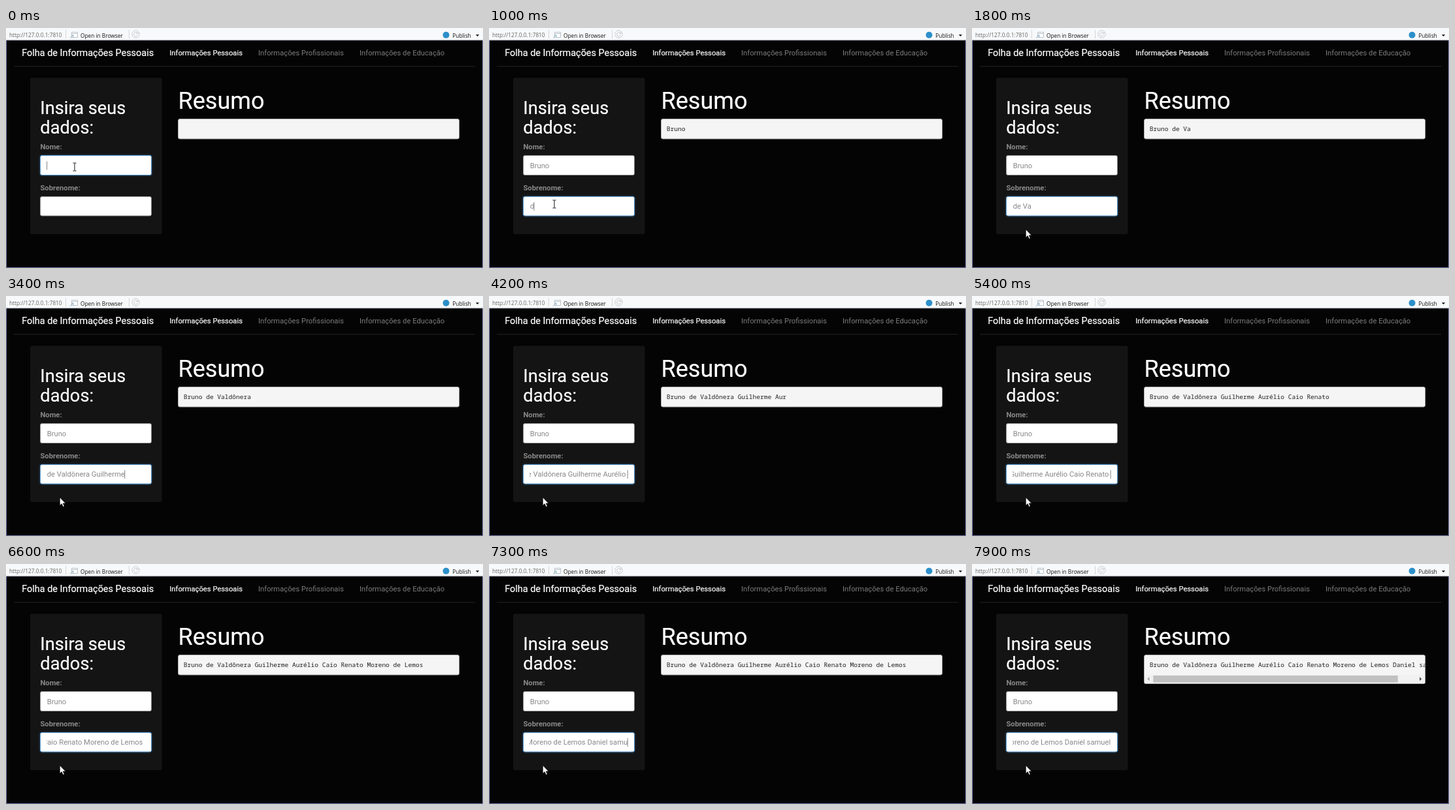
Write an HTML page that moves like this. It is 730 px wide and 368 px high and loops after 8000 ms.

```html
<!DOCTYPE html>
<html lang="pt">
<head>
<meta charset="utf-8">
<style>
html, body { margin: 0; width: 100%; height: 100%; overflow: hidden; background: #040404; }
svg { display: block; width: 730px; height: 368px; }
text { font: 11.22px Roboto, sans-serif; fill: #888; white-space: pre; }
.ui text { font: 8.3px "Open Sans", sans-serif; fill: #111; }
.ui .url { fill: #666; }
.brand { font-size: 14.43px; }
.h3 { font-size: 27.25px; }
.h2 { font-size: 36.1px; }
.brand, .on, .h2, .h3 { fill: #fff; stroke: #fff; stroke-width: .22; }
.link { fill: #7c7c7c; }
.label { font-weight: bold; }
.mono { font: 9.55px "Noto Sans Mono", monospace; fill: #222; }
.box { fill: #fff; stroke: #8c8c8c; }
.focus { stroke: #5b9bd0; filter: drop-shadow(0 0 1.5px rgba(70, 130, 190, .55)); }
</style>
</head>
<body>
<svg viewBox="0 0 730 368">
  <defs>
    <clipPath id="fieldClip"><rect x="62" y="190" width="151.5" height="105"/></clipPath>
    <clipPath id="preClip"><rect x="264" y="140" width="429.5" height="30"/></clipPath>
  </defs>
  <rect width="730" height="368" fill="#040404"/>
  <path d="M.5 18V367.5H729.5V18" fill="none" stroke="#7a80ae"/>

  <g class="ui">
    <rect width="730" height="18.5" fill="#f8f9fa"/>
    <path d="M0 18.7H730" stroke="#aeb5c2"/>
    <path d="M91.5 3V16M188.5 3V16" stroke="#d3d6d9"/>
    <text class="url" x="5" y="14">http://127.0.0.1:7810</text>
    <g fill="#fff" stroke="#b9c3cb">
      <path d="M100.5 6.5H109.5V14.5H100.5ZM100.5 8.5H109.5"/>
      <path d="M98 15.5L103 11M100 11H103V14" fill="none" stroke="#8eb0c4"/>
    </g>
    <text x="114" y="14.5">Open in Browser</text>
    <g fill="none" stroke="#c6cacd">
      <circle cx="198.5" cy="9.5" r="5.7"/>
      <path d="M201 8A3 3 0 1 0 201.4 10.5M202 6V8.5H199.5"/>
    </g>
    <circle cx="673.5" cy="10.8" r="5" fill="#2c8fc9"/>
    <text x="683.3" y="14.5">Publish</text>
    <path d="M718.8 10H724.2L721.5 13Z" fill="#222"/>
  </g>

  <text class="brand" x="24.3" y="43">Folha de Informações Pessoais</text>
  <text class="on" x="250.3" y="41.7">Informações Pessoais</text>
  <text class="link" x="386" y="41.7">Informações Profissionais</text>
  <text class="link" x="541" y="41.7">Informações de Educação</text>
  <path d="M12 58.8H718" stroke="#242424"/>

  <rect x="37" y="76.5" width="201.5" height="239.5" rx="3" fill="#141414"/>
  <text class="h3" x="52.3" y="132">Insira seus</text>
  <text class="h3" x="52.3" y="161.7">dados:</text>
  <text class="label" x="52.4" y="186.3">Nome:</text>
  <text class="label" x="52.4" y="248.8">Sobrenome:</text>
  <rect id="box0" x="52.5" y="195.5" width="170" height="30" rx="2.5"/>
  <rect id="box1" x="52.5" y="258.5" width="170" height="29.5" rx="2.5"/>
  <g clip-path="url(#fieldClip)">
    <text id="first" x="62.7" y="214.5"></text>
    <text id="last" y="277.2"></text>
    <rect id="caret" width=".9" height="13" fill="#777"/>
  </g>

  <text class="h2" x="263.5" y="123.8">Resumo</text>
  <rect id="pre" x="263.5" y="139.5" width="430" rx="2.5" fill="#f5f5f5" stroke="#a8a8a8"/>
  <g clip-path="url(#preClip)"><text class="mono" id="out" x="271.8" y="158.3"></text></g>
  <g id="bar">
    <rect x="264" y="170" width="429" height="13" fill="#f1f1f1"/>
    <rect id="thumb" x="277.3" y="171" height="10.5" fill="#c1c1c1"/>
    <path d="M271.5 173.2V179.2L268.3 176.2Z" fill="#a3a3a3"/>
    <path d="M685 173.2V179.2L688.2 176.2Z" fill="#505050"/>
  </g>

  <g id="mouse">
    <path id="beam" d="M-2.5 -6H-.7L0 -5.4L.7 -6H2.5M-2.5 6H-.7L0 5.4L.7 6H2.5M0 -5.4V5.4" fill="none" stroke="#111"/>
    <path id="arrow" d="M0 0V12.6L2.9 9.9L5 14.6L7 13.7L5 9.2H8.9Z" fill="#fff" stroke="#000" stroke-width=".7"/>
  </g>
</svg>
<script>
const $ = id => document.getElementById(id);
const set = (id, attrs) => { for (const k in attrs) $(id).setAttribute(k, attrs[k]); };
const show = (id, on) => set(id, { visibility: on ? 'visible' : 'hidden' });

const FIRST = 'Bruno';
const LAST = 'de Valdônera Guilherme Aurélio Caio Renato Moreno de Lemos Daniel samuel';
const LOOP = 8000, DEBOUNCE = 250, BLINK = 500, SWITCH = 880, CHAR = 5.73;

// Typing bursts: start, end, characters present at the end
const firstKeys = [[250, 680, 5]];
const lastKeys = [
  [900, 1250, 5], [1850, 2400, 12], [2700, 3390, 22], [3450, 3650, 26],
  [3950, 4190, 31], [4500, 5050, 43], [5450, 6050, 59], [6700, 7380, 72]
];
// Pointer stops: time, x, y
const stops = [[0, 105, 213], [700, 105, 213], [860, 100, 270], [1250, 100, 270], [1550, 82.3, 308.7], [LOOP, 82.3, 308.7]];

// Returns the typed length, the length already echoed and the last key time
function typing(keys, t) {
  let count = 0, echoed = 0, last = 0;
  keys.forEach(([start, end, n], i) => {
    if (t < start) return;
    const from = i ? keys[i - 1][2] : 0;
    count = from + Math.floor((n - from) * Math.min(1, (t - start) / (end - start)));
    last = Math.min(t, end);
    const next = i + 1 < keys.length ? keys[i + 1][0] : LOOP;
    if (t >= end + DEBOUNCE && next >= end + DEBOUNCE) echoed = n;
  });
  return { count, echoed, last };
}

function pointer(t) {
  const i = stops.findIndex(s => s[0] > t);
  const [t0, x0, y0] = stops[i - 1], [t1, x1, y1] = stops[i];
  const p = (t - t0) / (t1 - t0), e = p * p * (3 - 2 * p);
  return [x0 + (x1 - x0) * e, y0 + (y1 - y0) * e];
}

function draw(now) {
  const t = now % LOOP;
  const a = typing(firstKeys, t), b = typing(lastKeys, t);
  const focus = t < SWITCH ? 0 : 1;
  $('first').textContent = FIRST.slice(0, a.count);
  $('last').textContent = LAST.slice(0, b.count);
  set('last', { x: Math.min(62.7, 212.2 - $('last').getComputedTextLength()) });
  [0, 1].forEach(i => set('box' + i, { class: i === focus ? 'box focus' : 'box' }));

  const field = $(focus ? 'last' : 'first');
  const idle = t - (focus ? Math.max(b.last, SWITCH) : a.last);
  set('caret', {
    x: +field.getAttribute('x') + field.getComputedTextLength() - .5,
    y: focus ? 267 : 204.5
  });
  show('caret', idle % (2 * BLINK) < BLINK);

  const text = a.echoed ? FIRST + ' ' + LAST.slice(0, b.echoed) : '';
  const ratio = 428 / (text.length * CHAR + 16);
  $('out').textContent = text;
  show('bar', ratio < 1);
  set('thumb', { width: 405 * Math.min(1, ratio) });
  set('pre', { height: ratio < 1 ? 44 : 30.5 });

  const [x, y] = pointer(t);
  const inField = y > 195 && y < 226 || y > 258 && y < 288;
  set('mouse', { transform: `translate(${x} ${y})` });
  show('beam', inField);
  show('arrow', !inField);
  requestAnimationFrame(draw);
}
requestAnimationFrame(draw);
</script>
</body>
</html>
```
